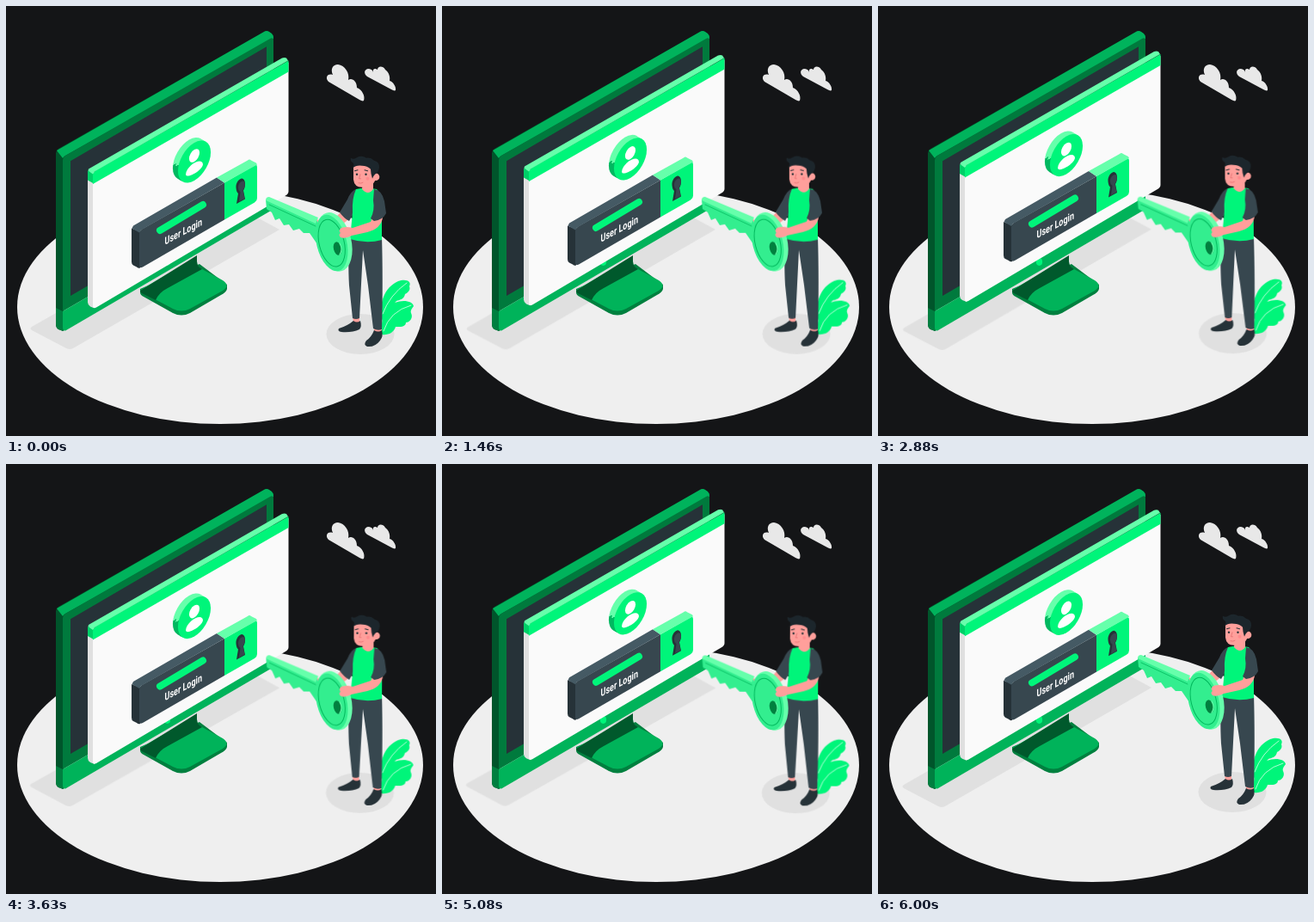
An HTML page without scripts that plays this animation: 500 by 500 pixels, repeating every 6040 ms.

```html
<!DOCTYPE html>
<html lang="en">
<head>
<meta charset="utf-8">
<title>User Login</title>
<style>
  html, body { margin: 0; width: 100%; height: 100%; overflow: hidden; background: #141517; }
  svg { display: block; width: 100%; height: 100%; }

  .sway  { transform-origin: 250px 291px; animation: sway 6040ms linear infinite; }
  .float { animation: float 6040ms linear infinite; }

  /* 1.5 s rocking, restarted with the loop */
  @keyframes sway {
    0% { transform: rotate(0deg); }
    6.209%, 31.043%, 55.877%, 80.712% { transform: rotate(1deg); }
    18.626%, 43.46%, 68.295%, 93.129% { transform: rotate(-1deg); }
    100% { transform: rotate(.107deg); }
  }
  /* rests for 1 s, then bobs every 3 s */
  @keyframes float {
    0%, 16.556%, 66.225% { transform: translateY(-.5px); }
    41.391%, 91.06% { transform: translateY(-10.5px); }
    100% { transform: translateY(-6.9px); }
  }

  .green { fill: #00f57a; }
  .light { fill: #66ffab; }
  .slate { fill: #37474f; }
  .ink   { fill: #263238; }
  .skin  { fill: #ff9f9b; }
  .key   { fill: #33ee8f; }
  .shade { fill: #e0e0e0; }
  .line  { fill: none; stroke-linecap: round; stroke-linejoin: round; }
  text { font: 600 12.5px Roboto, Inter, sans-serif; fill: #fff; }
</style>
</head>
<body>
<svg viewBox="0 0 500 500">
  <defs>
    <linearGradient id="rim" x1="0" y1="0" x2="0" y2="1">
      <stop offset=".42" stop-color="#66ffab"/>
      <stop offset=".42" stop-color="#00b860"/>
    </linearGradient>
  </defs>

  <rect width="500" height="500" fill="#141517"/>
  <ellipse cx="249" cy="350" rx="236" ry="136" fill="#efefef"/>

  <g class="sway shade">
    <path d="M30 373L272 235L318 260L78 398Q74 400 70 398L30 377Q27 375 30 373Z"/>
    <ellipse cx="412" cy="381.5" rx="39.5" ry="23.5"/>
  </g>

  <g fill="#e8e8e8">
    <path d="M375 88C371 84 373 78 380 80C377 73 380 68 386 68C394 69 400 78 398 86C402 83 408 87 408 95C414 97 418 105 416 110C415 111 413 110 411 109Z"/>
    <path d="M420 82C416 79 416 74 421 73C424 73 426 74 427 77C426 73 429 72 432 74C432 70 438 69 441 74C445 77 447 82 446 87C450 88 454 94 453 98C452 99 450 98 448 97Z"/>
  </g>

  <!-- stand -->
  <path fill="#00803f" d="M156 329L225 300L257 324V329Q256 333 250 336L214 357Q204 362 194 357L160 338Q156 336 156 333Z"/>
  <path fill="#00b35a" d="M158 329L222 292V297Q222 303 228 306L252 319Q261 325 252 331L214 352Q204 357 194 352L160 334Q154 331 158 329Z"/>
  <path fill="#00592c" d="M156 331L222 290V297Q222 303 228 306L188 328Q178 333 174 342L158 334Q156 333 156 331Z"/>

  <!-- monitor -->
  <path fill="#00552b" d="M58 171Q58 168 61 166L300 30Q303 28 306 30L311 34V60L67 185V378L61 376Q58 374 58 370Z"/>
  <path fill="#00b35c" d="M59 168L300 30Q303 28 306 30L309 32Q311 34 311 38L69 174Q67 175 66 177Z"/>
  <path fill="#007a3d" d="M66 179Q66 176 69 174L307 38Q311 36 311 40V213L66 355Z"/>
  <path class="ink" d="M75 180.300L303 47.300V205L75 337Z"/>
  <path fill="#007f40" d="M58 351L66 355V378L61 376Q58 374 58 370Z"/>
  <path fill="#00b35a" d="M66 355L311 213V233Q311 236 308 238L70 377Q66 379 66 374Z"/>
  <ellipse class="green" cx="187.500" cy="297.500" rx="3.600" ry="4.400"/>

  <!-- window -->
  <g class="float">
    <path class="shade" d="M95 193L103 194V352L98 350Q95 348 95 345Z"/>
    <path fill="#fafafa" d="M101 196L328.500 66V216Q328.500 219 325 221L105 351Q101 353 101 349Z"/>
    <path fill="#00cf68" d="M95 192L102 195V207L95 203Z"/>
    <path class="green" d="M101 197Q101 194 104 192L328.500 64V77L101 207.500Z"/>
    <path class="light" d="M96 190L321 61Q324 60 326 61L328 64L103 193L101 196L95.500 192Z"/>

    <!-- badge -->
    <g fill="url(#rim)">
      <circle r="22" transform="matrix(.866 -.5 0 1 213 178)"/>
      <circle r="22" transform="matrix(.866 -.5 0 1 216 179.800)"/>
    </g>
    <g transform="matrix(.866 -.5 0 1 219 181.500)">
      <circle class="green" r="22"/>
      <g fill="#fff">
        <circle cy="-7" r="7"/>
        <path d="M-11.500 9C-11 -1 11 -1 11.500 9C11 15.500 -11 15.500 -11.500 9Z"/>
      </g>
    </g>

    <!-- login field -->
    <path class="ink" d="M146 259L156 263V305Q154 306 152 304L148 302Q146 301 146 298Z"/>
    <path class="slate" d="M155 265Q155 262 158 260L254 206V249L159 304Q155 306 155 302Z"/>
    <path fill="#455a64" d="M148 256L245 200L254 206L157 261L155 264L146.500 259Z"/>
    <path class="green" d="M254 206L289 186Q292 184 292 188V224Q292 227 289 229L254 249Z"/>
    <path class="light" d="M245 200L281 180Q283 178 285 180L291 183L292 185L254 206Z"/>
    <path class="line" stroke="#00f57a" stroke-width="8" d="M179 261.500L229 231.500"/>
    <text transform="matrix(.72 -.385 0 1 184.500 278.500)">User Login</text>
    <path class="ink" d="M267.500 212C267 206 271 201 274.500 201C279 202 279 211 276 215L278 225L268 230.500L270 218.500Q268 217 267.500 212Z"/>
    <path class="slate" d="M270 212C270 207 273 204 276 204C279 206 278 211 275.500 214.500L277.500 224.500L271 228L272.500 217Q270 215 270 212Z"/>
  </g>

  <!-- visitor -->
  <g class="sway">
    <path class="green" d="M437 366C433 346 440 327 456 320C465 317 472 320 469 326C471 331 466 334 464 335C463 341 457 342 454 343C448 350 442 356 437 366Z"/>
    <path class="green" d="M437 382C436 362 440 347 452 345C462 341 473 343 474 349C472 352 470 354 471 357C474 363 469 368 465 368C465 374 456 373 453 373C451 380 444 383 437 382Z"/>
    <path class="line" stroke="#dfffee" stroke-width=".8" d="M438 358Q446 336 466 322M439 378Q446 355 471 348"/>

    <path class="skin" d="M403 360H411V368H404ZM428 372H437V379H428Z"/>
    <path class="ink" d="M404 366Q408 369 412 366Q414 373 411 376Q402 380 390 379Q385 378 387 375Q397 372 404 366Z"/>
    <path class="ink" d="M428 377Q433 380 437 377Q439 384 435 389Q429 397 420 396Q415 394 419 389Q425 385 428 377Z"/>
    <path class="slate" d="M400 268L437 268C438 300 438 340 437 376Q432 378 427 375L421 325L415 284L411 363Q407 365 403 363L399 325C398 305 398 290 400 268Z"/>

    <path class="skin" d="M390 238L400 246Q393 254 382 258L376 251Q384 247 390 238ZM351 248Q356 245 364 249L361 254Z"/>
    <path class="slate" d="M407 213Q401 215 397 225L388 240Q393 247 399 250L407 236Z"/>
    <path class="green" d="M407 213Q418 210 431 213Q438 220 437 242V272Q419 277 400 271L403 240Q402 224 407 213Z"/>
    <path class="skin" d="M415 203H427V213Q421 221 414 213Z"/>

    <!-- key -->
    <path class="key" d="M302 225L362 250L362 277L353 264L346 264L341 259L334 261L329 254L323 255L318 247L313 249L309 240L303 236Z"/>
    <path class="light" d="M302 226Q302 222 306 222L363 246L360 253Z"/>
    <path class="line" stroke="#00b85c" stroke-width=".8" d="M306 231L360 256"/>
    <g transform="rotate(-14 381 274.500)">
      <ellipse class="light" cx="381.500" cy="274.500" rx="20" ry="35"/>
      <ellipse class="key" cx="378.500" cy="275" rx="17.500" ry="33.500"/>
      <ellipse cx="378.500" cy="275" rx="14.500" ry="28" fill="none" stroke="#00b85c"/>
    </g>
    <ellipse cx="385.500" cy="282" rx="4.600" ry="7.800" fill="#00803f" transform="rotate(-14 385.500 282)"/>
    <path class="line" stroke="#66ffab" stroke-width="1.200" d="M388 276Q392 283 388 289"/>

    <path class="skin" d="M426 246L438 246Q436 259 420 263L402 267Q394 271 389 269Q386 266 389 264Q386 261 390 258Q396 256 403 258L424 251Z"/>
    <path class="slate" d="M428 213Q437 214 440 227L442 241Q438 249 428 250L424 247Q429 238 427 226Z"/>

    <!-- head -->
    <g transform="translate(0 -1.200)">
      <path class="skin" d="M404 188Q416 181 428 190L430 203Q426 212 414 212Q405 212 404 203Z"/>
      <circle class="skin" cx="430" cy="200" r="4.300"/>
      <path fill="#1c262c" d="M403 190Q405 186 404 184Q400 182 401 178Q404 180 407 178Q413 174 419 178Q424 177 428 181Q434 182 434 189Q433 195 429 197Q427 199 426 202Q424 196 424 191Q420 187 414 187Q407 186 403 190Z"/>
      <g class="ink">
        <circle cx="408" cy="197" r="1.200"/>
        <circle cx="418.500" cy="197" r="1.200"/>
      </g>
      <path class="line" stroke="#263238" stroke-width="1.100" d="M405.500 193L409 192M417 192L420.500 193"/>
      <path class="line" stroke="#e56f70" stroke-width=".8" d="M412 197L410.500 202H412.500M410 207Q413 208 415 206.500"/>
      <circle cx="420.500" cy="202" r="2" fill="#ff8c8e"/>
    </g>
  </g>
</svg>
</body>
</html>
```
